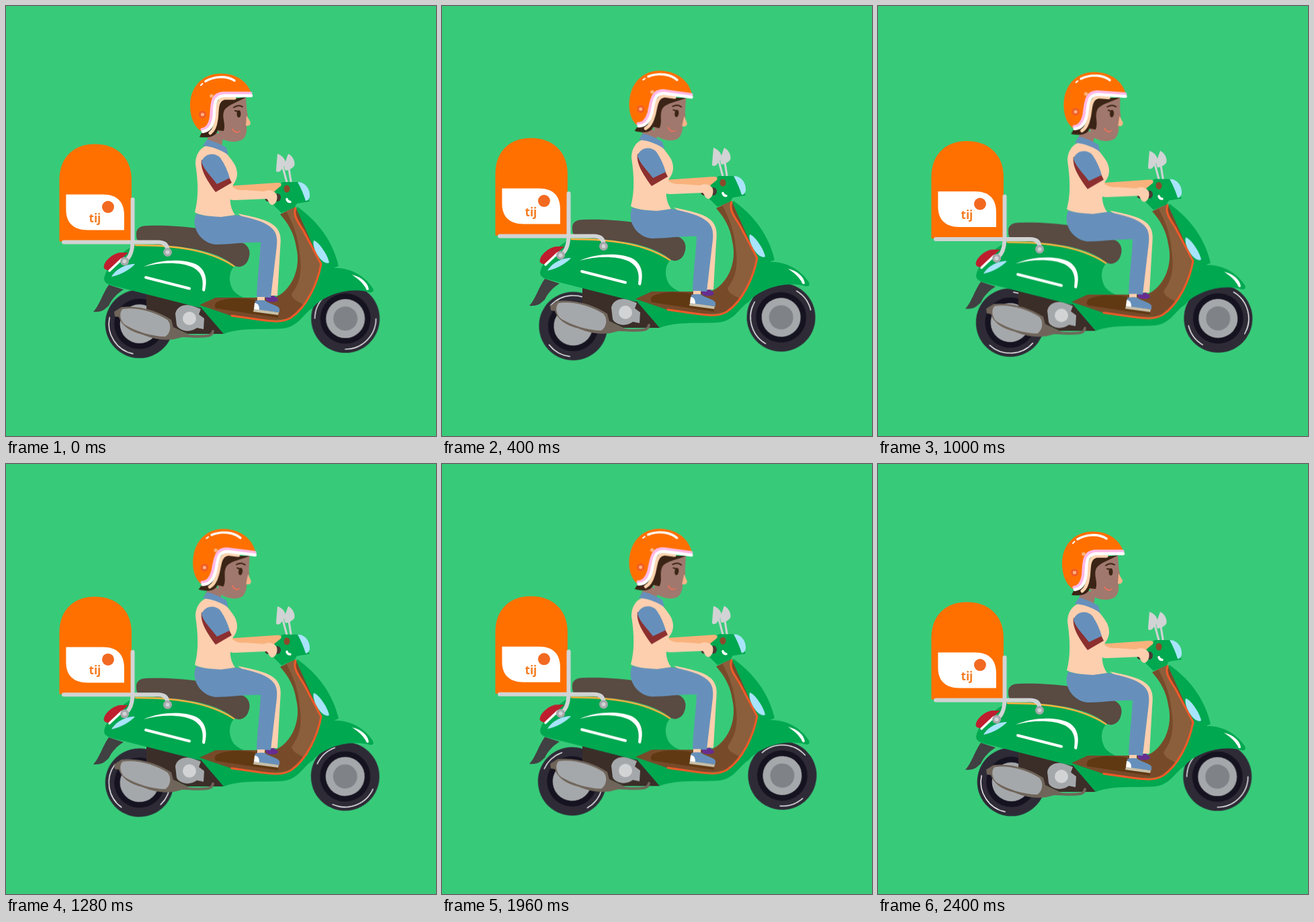
These frames come from a looping animation (640 px wide and 640 px high, 2.44 s). An HTML page:

```html
<!DOCTYPE html>
<html lang="en">
<head>
<meta charset="utf-8">
<title>Scooter delivery</title>
<style>
  html, body { margin: 0; width: 100%; height: 100%; overflow: hidden; background: #37cb79; }
  svg { display: block; width: 100vw; height: 100vh; }

  /* Three 800 ms bounces and two wheel turns in 2400 ms, then a 40 ms rest */
  .bob, .nod { animation: bob 2440ms cubic-bezier(.37, 0, .63, 1) infinite; }
  .nod { animation-name: nod; transform-origin: 288px 185px; }
  .spin { animation: spin 2440ms linear infinite; }
  @keyframes bob {
    0%, 32.787%, 65.574%, 98.361%, 100% { transform: translateY(0); }
    16.393%, 49.18%, 81.967% { transform: translateY(-9px); }
  }
  @keyframes nod {
    0%, 32.787%, 65.574%, 98.361%, 100% { transform: rotate(0deg); }
    16.393%, 49.18%, 81.967% { transform: rotate(8deg); }
  }
  @keyframes spin {
    0% { transform: rotate(0deg); }
    98.361%, 100% { transform: rotate(720deg); }
  }

  .line { fill: none; stroke-linecap: round; stroke-linejoin: round; }
  .green { fill: #00a850; }
  .orange { fill: #ff7000; }
  .peach { fill: #fdcfae; }
  .blue { fill: #6690bb; }
  .glass { fill: #a8e4fb; }
  .silver { fill: #d1d3d4; }
  .steel { fill: #a5a8ab; }
  .skin { fill: #a0786d; }
  .hair { fill: #3b2415; }
  .white { fill: #fff; }
  .shine { stroke: #fff; }
  .rail { stroke: #d1d3d4; }
  .pipe { stroke: #70655a; }
</style>
</head>
<body>
<svg viewBox="0 0 640 640">
  <defs>
    <g id="tyre">
      <circle r="51" fill="#2e2b37"/>
      <circle r="37.5" fill="#161320"/>
      <circle r="29" class="steel"/>
    </g>
    <!-- Tyre glints: a quarter turn and a 46 degree arc, both from 3 o'clock -->
    <path id="long" class="line shine" stroke-width="1.4" d="M45.5 0A45.5 45.5 0 0 1 0 45.5"/>
    <path id="short" class="line shine" stroke-width="1.4" d="M45.5 0A45.5 45.5 0 0 1 31.6 32.7"/>
  </defs>

  <rect width="640" height="640" fill="#37cb79"/>

  <!-- Wheels sit slightly off their axles -->
  <g transform="translate(196 473.8)">
    <g class="spin">
      <g transform="translate(2.6 -.7)">
        <use href="#tyre"/>
        <use href="#long" transform="rotate(102)"/>
        <use href="#short" transform="rotate(-24)"/>
      </g>
    </g>
  </g>
  <g transform="translate(505.5 464.2)">
    <g class="spin">
      <g transform="translate(-.3 1.1)">
        <use href="#tyre"/>
        <circle r="18" fill="#7f8286"/>
        <use href="#long"/>
        <use href="#short" transform="rotate(180)"/>
      </g>
    </g>
  </g>

  <g class="bob">
    <!-- Engine and exhaust -->
    <path fill="#414042" d="M153 415L175 422C165 428 157 437 153 446L146 452Q139 456 130 455C139 446 143 429 153 415Z"/>
    <path fill="#3b2e29" d="M209 427L290 445L324 488L270 488L244 476L209 456Z"/>
    <path class="steel" d="M252 458C254 447 266 443 277 446L290 451L287 459L295 465L294 481L284 479C274 487 258 484 254 475Z"/>
    <circle cx="273" cy="465" r="10" class="silver"/>
    <path class="line pipe" stroke-width="4" d="M240 492C260 488 282 494 300 491Q307 490 308 484"/>
    <path fill="#70655a" d="M161 455L172 448C200 445 228 455 246 467L249 478L274 490L250 496C230 499 213 493 203 489C184 484 172 476 168 463L162 462Z"/>
    <path class="steel" d="M174 451C196 448 222 456 240 467C247 474 245 487 237 492C217 492 193 484 178 475C169 469 168 455 174 451Z"/>

    <!-- Body panels -->
    <path class="green" d="M286 444L324 488C350 478 385 482 412 480C436 477 441 459 457 449C470 432 510 417 541 426Q549 427 546 420C532 399 510 389 488 390L495 387C487 352 466 322 434 299L428 304L446 385L415 437L400 445Z"/>
    <path class="green" d="M146 406C148 390 170 366 193 355C246 354 301 363 340 387C331 396 331 411 338 423C347 434 360 437 376 438L312 440L288 449L154 415Q146 412 146 406Z"/>
    <path fill="#774b2a" d="M288 445L312 434H400C424 424 440 392 432 359C429 338 420 324 408 310L431 299L469 384C465 410 450 445 430 460C412 472 380 468 335 461Z"/>
    <path fill="#8b5f3c" d="M417 305L431 299C428 312 434 322 443 335L469 384C465 406 456 428 443 444C434 440 426 436 425 429C438 412 441 394 437 368C435 344 428 326 417 305Z"/>
    <path fill="#603913" d="M313 441C328 434 346 434 370 437L405 452V464L312 450Q309 446 313 441Z"/>
    <path class="line" stroke="#f15a29" stroke-width="3" d="M431 301C427 312 435 322 443 335L469 384C464 412 448 448 424 464C410 472 394 469 378 467L336 461"/>
    <path class="line" stroke="#fbb040" stroke-width="2.5" d="M193 356C250 356 300 362 339 387"/>
    <path fill="#594a42" d="M194 341C193 331 200 327 210 327C238 326 262 328 285 331C310 336 335 344 355 354C364 360 364 370 360 379C356 387 348 390 341 387C316 367 280 360 245 357L201 352C195 350 194 346 194 341Z"/>
    <path class="white" d="M205 388C230 377 262 376 282 384C298 392 300 408 296 424Q294 426 292 423C294 409 293 397 278 389C260 381 231 381 205 388Z"/>
    <path class="line shine" stroke-width="4" d="M208 404L273 420.5"/>

    <!-- Lights -->
    <path fill="#be1e2d" d="M146 386C148 378 160 368 170 367L182 367C173 375 164 383 155 393C149 394 144 391 146 386Z"/>
    <path class="line shine" stroke-width="3.5" d="M154 394L172 377"/>
    <path class="glass" d="M157 403C162 394 175 384 192 384C186 391 172 400 157 403Z"/>
    <path class="glass" d="M458 349C466 351 479 371 481 382C478 384 472 382 466 374C460 366 456 355 458 349Z"/>
    <path class="white" d="M515 400C529 403 539 412 540 422Q537 425 535 419C530 411 524 406 515 400Z"/>

    <!-- Delivery box and rack -->
    <g transform="translate(-.6 -.4)">
      <path class="orange" d="M80 351V260C80 223 104 206 133 206S187.5 223 187.5 260V351Z"/>
      <path class="white" d="M90 281H145C167 281 176 293 176.5 311V334H122C100 334 90 322 90 304Z"/>
      <circle cx="152.5" cy="299.5" r="9" fill="#f26a21"/>
      <text x="133" y="322" text-anchor="middle" fill="#f47b20" font-family="'Open Sans', sans-serif" font-weight="700" font-size="17">tij</text>
    </g>
    <path class="line rail" stroke-width="6" d="M86 351.5H226Q240 351.5 240.5 363M188.5 288V350Q188 373 177 379"/>
    <g class="steel">
      <circle cx="240.5" cy="366.5" r="6.5"/><circle cx="176.5" cy="380" r="6.5"/>
    </g>
    <g class="silver">
      <circle cx="240.5" cy="366.5" r="3"/><circle cx="176.5" cy="380" r="3"/>
    </g>

    <!-- Handlebar and mirrors -->
    <path class="line rail" stroke-width="3" d="M412 240L419 266M421 242L425 267"/>
    <path class="silver" d="M404 220C412 223 417 229 416 236L408 246Q402 249 402 244Z"/>
    <path class="silver" d="M420 220C427 223 431 232 429 238Q424 244 416 245Q413 240 415 234Z"/>
    <path class="green" d="M400 270L412 262H436L452 291L433 294L429 300L410 308L398 296Z"/>
    <path class="glass" d="M434 262C446 262 453 273 452 284Q450 290 446 290C443 280 439 271 434 262Z"/>
    <ellipse cx="418" cy="272" rx="4.5" ry="5.5" fill="#8b4a2b"/>
    <path class="line shine" stroke-width="3.5" d="M418 287.5Q419 291.5 423 291.5"/>

    <!-- Far limbs -->
    <path class="peach" d="M345 309C375 315 396 320 404 332C410 341 409 350 408 362L404 431L393 431L397 345Z"/>
    <path fill="#662d91" d="M386 433L398 431C403 433 406 436 404 439Q396 442 388 439Z"/>
    <path fill="#f9b27c" d="M330 268L404 263Q412 263 409 268L398 277L336 286Z"/>

    <!-- Head -->
    <g class="nod">
      <path class="skin" d="M304 186L324 192L321 208L298 203Z"/>
      <path class="skin" d="M316 142L357 136C358 148 358 156 360 163L358 179C359 187 357 193 354 197C346 204 332 203 322 198L312 180Z"/>
      <path fill="#f8b48a" d="M358 163L364 173C364 178 360 179 357 178Z"/>
      <path class="hair" d="M315 140L357 136C345 143 330 147 325 155C320 166 328 175 324 186L315 185C313 194 302 197 288 195L292 187C305 188 311 178 313 165Z"/>
      <ellipse cx="346.5" cy="160.5" rx="3" ry="5.5" class="hair"/>
      <path class="line" stroke="#3b2415" stroke-width="2" d="M339 151Q346 146 352 150M341 156L346 157"/>
      <path class="line" stroke="#f4705a" stroke-width="1.6" d="M337 183Q342 191 348 186"/>
      <path class="line" stroke="#fdd4b0" stroke-width="5" d="M340 137H325C312 140 315 157 313 169Q311 184 304 189"/>
      <path class="orange" d="M366 132C360 112 342 100.5 320 100.5C292 100.5 274 121 274 148C274 168 282 182 292 187C301 185 304 178 305 165C306 150 306 138 318 132Z"/>
      <path class="line" stroke="#ffb9e6" stroke-width="5" d="M364 130H322C305 132 307 148 305.5 165Q303 182 292 184"/>
      <path class="line shine" stroke-width="4.5" d="M365 133.5H324C308 135 311 150 309.5 165Q307 185 293 187"/>
      <circle cx="292.5" cy="161.5" r="5.5" fill="#f15a29"/>
      <circle cx="292.5" cy="161.5" r="2.6" fill="#fbb27c"/>
      <circle cx="306" cy="134" r="2.8" fill="#fbb27c"/>
      <path class="line shine" stroke-width="3.5" d="M297 112C309 105 327 103 340 111"/>
      <path class="line shine" stroke-width="2" d="M290 118L292.5 115.5"/>
    </g>

    <!-- Torso and near limbs -->
    <path class="blue" d="M283 309C300 314 325 314 341 311C365 315 385 321 395 330C403 337 404 346 403 357L394 434L373 433C374 405 378 375 379 352C360 351 334 355 312 355C293 353 278 335 281 316Z"/>
    <path class="peach" d="M298 208C288 212 282 222 282 235C286 262 287 285 281 307C288 311 300 313 320 314L341 311C333 300 331 285 338 266C346 256 345 246 341 237C332 222 322 212 313 208Z"/>
    <path class="blue" d="M299 199C307 200 318 205 328 211L331 222C324 216 308 209 293 208Z"/>
    <rect x="374" y="433" width="11" height="8" class="peach"/>
    <path class="blue" d="M371 439Q378 437 385 438C392 444 402 444 407 450V456L369 452Z"/>
    <path class="white" d="M370 442Q377 442 377 452L369 452Z"/>
    <path fill="#c9c0aa" d="M369 451L406 456L405 460L368 455Z"/>
    <ellipse cx="390" cy="287" rx="4.5" ry="4" fill="#4a3a34"/>
    <ellipse cx="404" cy="285" rx="5" ry="6" fill="#4a3a34"/>
    <path class="peach" d="M320 264L332 262C336 271 344 275 356 274L384 276C392 272 400 275 403 281C405 288 401 296 396 296C391 295 391 289 388 287L340 289C330 289 324 281 318 273Z"/>
    <path fill="#8c2f2f" d="M291 229C289 241 296 256 312 277L336 263L331 253Z"/>
    <path class="blue" d="M291 232C295 219 311 217 319 226C326 236 330 246 333 256L314 265C306 254 294 243 291 232Z"/>
  </g>
</svg>
</body>
</html>
```
